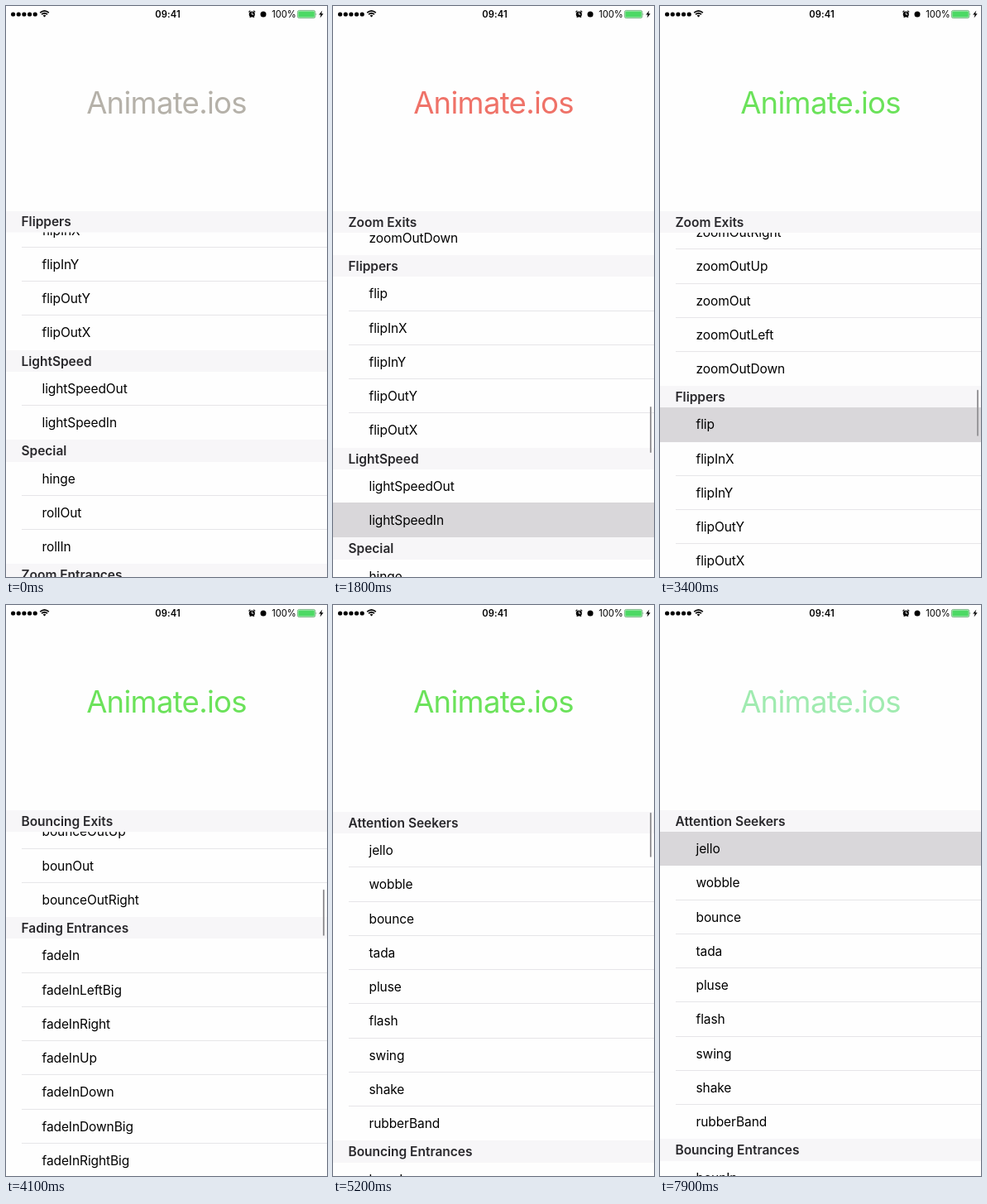
These frames come from a looping animation (388 px wide and 690 px high, 8 s). An HTML page:

```html
<!DOCTYPE html>
<html lang="en">
<head>
<meta charset="utf-8">
<title>Animate.ios</title>
<style>
  html, body { margin: 0; width: 100%; height: 100%; overflow: hidden; background: #fefefe; }
  #stage { position: relative; width: 388px; height: 690px; overflow: hidden; font: 15.5px Inter, Roboto, sans-serif; color: #000; }
  #status { position: absolute; left: 0; top: 0; font: 11.2px Inter, Roboto, sans-serif; }
  #title { position: absolute; left: 0; top: 92px; width: 388px; line-height: 51px; text-align: center; font-size: 36.5px; letter-spacing: -.7px; white-space: nowrap; }
  #view { position: absolute; left: 0; top: 248px; width: 388px; height: 442px; overflow: hidden; }
  #list { position: absolute; left: 0; top: 0; width: 388px; }
  .head { position: relative; z-index: 2; height: 26.24px; line-height: 28px; padding-left: 18.5px; background: #f7f6f8; color: #29282c; font-weight: 600; letter-spacing: -.02px; }
  .row { position: relative; height: 41.24px; line-height: 41.24px; padding-left: 43.5px; letter-spacing: -.09px; }
  .row:not(:last-child)::after { content: ""; position: absolute; left: 19px; right: 0; bottom: 0; height: 1px; background: #e6e5e8; }
  .row.on { background: #d9d7da; box-shadow: 0 -1px #d9d7da; }
  .row.on::after { display: none; }
  #bar { position: absolute; left: 382.5px; top: 0; width: 2.8px; border-radius: 2px; background: #99989b; }
</style>
</head>
<body>
<div id="stage">
  <svg id="status" width="388" height="20">
    <g id="signal"></g>
    <path d="M41.2 8.2Q46.5 3.6 51.8 8.2M43 10.2Q46.5 7.3 50 10.2" fill="none" stroke="#000" stroke-width="1.7"/>
    <path d="M44.6 11.4Q46.5 9.9 48.4 11.4L46.5 13.4Z"/>
    <text x="195.5" y="13.7" text-anchor="middle" font-weight="600" letter-spacing=".1">09:41</text>
    <circle cx="297.3" cy="10" r="3.6"/>
    <path d="M293.4 7.4L295.3 5.6M301.2 7.4L299.3 5.6M294.8 14L295.6 13M299.8 14L299 13" stroke="#000" stroke-width="1.2"/>
    <path d="M297.3 7.6V10.2H299.4" fill="none" stroke="#fefefe" stroke-width=".9"/>
    <circle cx="311" cy="10" r="3.5"/>
    <text x="321.3" y="13.7" letter-spacing="-.1">100%</text>
    <rect x="352.4" y="5.4" width="21.4" height="9.2" rx="2" fill="#c9f2d0" stroke="#4f9f5e" stroke-width=".7"/>
    <rect x="353.4" y="6.4" width="19.4" height="7.2" rx="1.2" fill="#4cd964"/>
    <path d="M374.6 8.4Q376.2 10 374.6 11.6Z" fill="#4f9f5e"/>
    <path d="M382.3 5.6L378.2 10.6H380.6L379.6 14.4L383.6 9.3H381.2Z"/>
  </svg>
  <div id="title">Animate.ios</div>
  <div id="view"><div id="list"></div><div id="bar"></div></div>
</div>
<script>
const LOOP = 8000, ROW = 41.24, HEAD = 26.24, VIEW = 442, CONTENT = 3480;
const $ = id => document.getElementById(id);
const named = (prefix, suffixes) => suffixes.split(',').map(s => prefix + s);

const sections = {
  'Attention Seekers': named('', 'jello,wobble,bounce,tada,pluse,flash,swing,shake,rubberBand'),
  'Bouncing Entrances': named('boun', 'In,ceInUp,ceInLeft,ceInDown,ceInRight'),
  'Bouncing Exits': named('boun', 'ceOutLeft,ceOutDown,ceOutUp,Out,ceOutRight'),
  'Fading Entrances': named('fadeIn', ',LeftBig,Right,Up,Down,DownBig,RightBig,Left,UpBig'),
  'Fading Exits': named('fadeOut', ',LeftBig,Right,Up,Down,DownBig,RightBig,Left,UpBig'),
  'Zoom Exits': named('zoomOut', 'Right,Up,,Left,Down'),
  'Flippers': named('flip', ',InX,InY,OutY,OutX'),
  'LightSpeed': named('lightSpeed', 'Out,In'),
  'Special': named('', 'hinge,rollOut,rollIn'),
  'Zoom Entrances': []
};

const heads = [], rows = {};
function add(parent, className, text = '') {
  const el = parent.appendChild(document.createElement('div'));
  el.className = className;
  el.textContent = text;
  return el;
}
let nextTop = 0;
for (const [name, items] of Object.entries(sections)) {
  const section = add($('list'), 'section');
  heads.push({ el: add(section, 'head', name), top: nextTop, travel: items.length * ROW });
  for (const item of items) rows[item] = add(section, 'row', item);
  nextTop += HEAD + items.length * ROW;
}
$('signal').innerHTML = [0, 1, 2, 3, 4]
  .map(i => `<circle cx="${8.6 + i * 6.65}" cy="10" r="2.6"/>`).join('');

const jello = [{ transform: 'none', offset: 0 }];
for (let i = 1; i < 9; i++) {
  const a = i < 2 ? 0 : 12.5 * (-1) ** (i - 1) / 2 ** (i - 2);
  jello.push({ transform: `skewX(${a}deg) skewY(${a}deg)`, offset: i / 9 });
}
jello.push({ transform: 'none', offset: 1 });

const spin = (angle, z, scale = 1) => `perspective(400px) translateZ(${z}px) rotateY(${angle}deg) scale(${scale})`;
const taps = [
  { row: 'lightSpeedIn', at: 400, start: 455, color: '#ef7268', frames: [
    { transform: 'translateX(388px) skewX(-30deg)', opacity: 0 },
    { transform: 'translateX(0px) skewX(20deg)', opacity: 1, offset: .6 },
    { transform: 'translateX(0px) skewX(-5deg)', opacity: 1, offset: .8 },
    { transform: 'translateX(0px) skewX(0deg)', opacity: 1 }] },
  { row: 'flip', at: 2300, start: 2340, color: '#6be25a', frames: [
    { transform: spin(-360, 0), easing: 'ease-out' },
    { transform: spin(-190, 150), offset: .4, easing: 'ease-out' },
    { transform: spin(-170, 150), offset: .5, easing: 'ease-in' },
    { transform: spin(0, 0, .95), offset: .8, easing: 'ease-in' },
    { transform: spin(0, 0) }] },
  { row: 'jello', at: 5880, start: 5880, color: '#a0ebb0', frames: jello }
];
for (const tap of taps) {
  tap.motion = $('title').animate(tap.frames, { duration: 1000 });
  tap.motion.pause();
}

// Scroll offset over time: [ms, px]
const scroll = [
  [0, 1954], [1380, 1954], [1500, 1925], [1650, 1862], [1800, 1836], [1950, 1834],
  [3150, 1834], [3270, 1795], [3400, 1679.2], [3600, 1265], [3850, 935], [4100, 733.7],
  [4300, 632], [4450, 480], [4600, 240], [4760, 0], [4850, -28], [5000, -12], [5200, -2],
  [5400, 0], [LOOP, 0]
];
const slope = i => (scroll[i + 1][1] - scroll[i][1]) / (scroll[i + 1][0] - scroll[i][0]);
function tangent(i) {
  if (i === 0 || i === scroll.length - 1) return 0;
  const a = slope(i - 1), b = slope(i);
  return a * b <= 0 ? 0 : 2 * a * b / (a + b);
}
function scrollAt(t) {
  const i = scroll.findIndex(key => key[0] > t) - 1;
  const [t0, y0] = scroll[i], [t1, y1] = scroll[i + 1];
  const d = t1 - t0, u = (t - t0) / d, v = 1 - u;
  return y0 * (1 + 2 * u) * v * v + y1 * u * u * (3 - 2 * u)
    + d * (tangent(i) * u * v * v - tangent(i + 1) * u * u * v);
}

const clamp = (x, lo, hi) => Math.min(hi, Math.max(lo, x));
const fade = (t, from, to) => clamp((t - from) / 80, 0, 1) * clamp((to - t) / 250, 0, 1);

function draw(t) {
  const offset = scrollAt(t);
  $('list').style.transform = `translateY(${-offset}px)`;
  for (const { el, top, travel } of heads)
    el.style.transform = `translateY(${clamp(offset - top, 0, travel)}px)`;

  const bar = $('bar').style;
  bar.transform = `translateY(${2.7 + Math.max(0, offset) * VIEW / CONTENT}px)`;
  bar.height = 56 + Math.min(0, offset) + 'px';
  bar.opacity = Math.max(fade(t, 1380, 2150), fade(t, 3150, 5750));

  let color = '#b5b1a9', selected = null;
  for (const tap of taps) {
    if (t >= tap.at) selected = tap.row;
    if (t >= tap.start) color = tap.color;
    tap.motion.currentTime = t - tap.start;
  }
  $('title').style.color = color;
  for (const { row } of taps) rows[row].classList.toggle('on', row === selected);
}

const began = performance.now();
function tick() {
  draw((performance.now() - began) % LOOP);
  requestAnimationFrame(tick);
}
tick();
</script>
</body>
</html>
```
